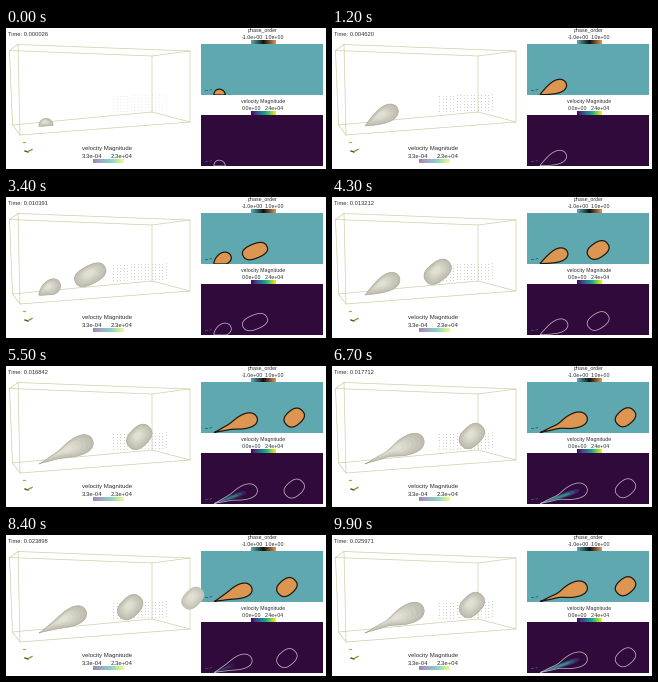
These frames come from a looping animation (320 px wide and 141 px high, 10000 ms). A matplotlib script:

```python
import numpy as np
import matplotlib.pyplot as plt
from matplotlib.animation import FuncAnimation
from matplotlib.colors import LinearSegmentedColormap, to_rgb
from matplotlib.patches import Polygon, Rectangle

W, H, DPI = 320, 141, 100
FRAMES, INTERVAL = 100, 100
PX = 72 / DPI

# Bubbles grow for PINCH seconds, then one leaves every PERIOD seconds.
PERIOD, PINCH = 0.00826, 0.0097
SPEED = 7600
LIFETIME = 0.0145

# The solver takes small time steps just before each pinch-off.
CLOCK = np.array([(0, 0.000026), (23, 0.008831), (31, 0.00945),
                  (43, 0.013212), (55, 0.016842), (67, 0.017712),
                  (84, 0.023898), (88, 0.0251), (99, 0.025971)])


def floor(x):
    return 98.5 - 0.073 * (x - 33)


def to_side(p, base):
    """Project points of the 3D mid plane onto a slice panel."""
    x, y = np.transpose(p)
    return np.column_stack([208 + 0.8 * (x - 33), base - 0.76 * (floor(x) - y)])


FOOT = np.array([33, 98])


def bulb(g):
    """Centre and radius of the growing head, g from 0 to 1."""
    return np.array([40 + 44 * g**1.2, 98 - 22 * g**0.6]), 7 + 2.7 * g


def growing(g):
    """Dome that stretches into a teardrop with a thinning neck."""
    centre, r = bulb(g)
    axis = (centre - FOOT) / np.hypot(*(centre - FOOT))
    normal = np.array([axis[1], -axis[0]])
    tip = centre + axis * r
    s = (1 - np.cos(np.linspace(0, np.pi, 40)))[:, None] / 2
    u = s ** (1 + 2 * g)
    neck = 1 - 0.45 * g**6 * np.exp(-((s - 0.36) / 0.16) ** 2)
    half = r * np.sqrt(4 * u * (1 - u)) * neck
    spine = FOOT + (tip - FOOT) * s
    c = np.vstack([spine + normal * half, (spine - normal * half)[::-1]])
    c[:, 1] = np.minimum(c[:, 1], floor(c[:, 0]))
    return c


def drifting(age):
    """Free bubble: a tilted, slightly boxy ellipse."""
    k = min(age / 0.005, 1)
    x = 79 + SPEED * age
    y = 78.5 - 0.14 * (x - 79)
    a, b, tilt = 17 - 3 * k, 9 + 0.6 * k, np.radians(25 + 20 * k)
    th = np.linspace(0, 2 * np.pi, 80, endpoint=False)
    u, v = (m * np.sign(f) * np.abs(f) ** 0.8
            for m, f in ((a, np.cos(th)), (b, np.sin(th))))
    return np.column_stack([x + u * np.cos(tilt) + v * np.sin(tilt),
                            y - u * np.sin(tilt) + v * np.cos(tilt)])


fig = plt.figure(figsize=(W / DPI, H / DPI), dpi=DPI, facecolor="white")
ax = fig.add_axes([0, 0, 1, 1])
ax.set_xlim(0, W)
ax.set_ylim(H, 0)
ax.axis("off")


def label(x, y, s, px, ha="center"):
    return ax.text(x, y, s, fontsize=px * PX, family="Liberation Sans",
                   color="#303030", ha=ha, va="baseline", zorder=9)


def line(pts, color, lw=0.7, **kw):
    ax.plot(*zip(*pts), color=color, lw=lw * PX, **kw)


def bar(x0, x1, y0, y1, cmap, alpha=1):
    ax.imshow(np.linspace(0, 1, 64)[None], extent=(x0, x1, y1, y0), cmap=cmap,
              alpha=alpha, aspect="auto", zorder=3)


def poly(color, edge="none", lw=0.0, clip=None, **kw):
    p = Polygon([(0, 0), (0, 1), (1, 0)], fc=color, ec=edge, lw=lw * PX, **kw)
    ax.add_patch(p)
    if clip is not None:
        p.set_clip_path(clip)
    return p


def panel(y, color):
    return ax.add_patch(Rectangle((195, y), 122, 51, fc=color, lw=0, zorder=1))


# Channel outline
FRONT = [(12, 16.5), (184, 23), (184, 94), (14, 107)]
BACK = [(3.5, 22.5), (146, 28), (146, 84), (6.5, 97)]
for face in (FRONT, BACK):
    line(face + face[:1], "#cfcda6")
for edge in zip(FRONT, BACK):
    line(edge, "#cfcda6")

gx, gy = np.meshgrid(np.arange(107, 162, 3.5), np.arange(68, 85, 3))
seeds = ax.scatter(gx, gy - (gx - 107) * 0.03, s=0.35, c="#bdbdb0", lw=0)

# Orientation axes
line([(17, 114), (19, 114)], "#b5b030", 1.2)
line([(19, 123), (22, 124)], "#3f5a25", 1.4)
line([(23, 123), (26, 121.5)], "#8f9a2c", 1.4)

# Slice panels
top = panel(16, "#5fa8b0")
low = panel(87, "#300a3a")
for y, c in ((62, "#2f6464"), (133, "#28586a")):
    line([(199, y), (201, y)], c, 0.9, zorder=2)
    line([(204, y), (205.5, y - 0.5)], c, 0.9, zorder=2)

# Legends
clock = label(2, 7.6, "", 5.8, "left")
label(101, 122, "velocity Magnitude", 6)
label(75.5, 129.5, "3.3e-04", 6, "left")
label(127, 129.5, "2.3e+04", 6, "right")
bar(87, 118, 131.5, 135.5, "viridis", 0.5)
phase_map = LinearSegmentedColormap.from_list(
    "phase", ["#5fa8b0", "#101010", "#de9450"])
for x, y, name, lo, hi, cmap in (
        (257, 4.3, "phase_order", "-1.0e+00", "1.0e+00", phase_map),
        (257, 75.5, "velocity Magnitude", "0.0e+00", "2.4e+04", "viridis")):
    label(x, y, name, 5.3)
    label(x - 21, y + 6.5, lo, 5.3, "left")
    label(x + 21, y + 6.5, hi, 5.3, "right")
    bar(x - 12, x + 13, y + 8, y + 11.5, cmap)

channel = Rectangle((0, 0), 168, H, transform=ax.transData)


class Bubble:
    """One body in the 3D view plus its two slices."""

    SHADES = 5

    def __init__(self):
        dark, light = (np.array(to_rgb(c)) for c in ("#bebcae", "#e2e0d4"))
        self.body = poly(dark, "#a9a796", 0.6, channel, zorder=4)
        self.inner = [poly(dark + (light - dark) * (i + 1) / self.SHADES,
                           clip=self.body, zorder=5)
                      for i in range(self.SHADES)]
        self.phase = poly("#dd9552", "#1c1610", 1.2, top, zorder=4)
        self.ring = poly("none", "#b9aebd", 0.8, low, zorder=6)
        self.parts = [self.body, self.phase, self.ring, *self.inner]

    def show(self, c):
        for p in self.parts:
            p.set_visible(c is not None)
        if c is None:
            return
        mid = c.mean(axis=0)
        self.body.set_xy(c)
        for i, p in enumerate(self.inner):
            k = 0.9 - 0.15 * i
            p.set_xy(mid + (c - mid) * k - (1 - k) * 2)
        self.phase.set_xy(to_side(c, 67))
        self.ring.set_xy(to_side(c, 138))


attached, free, leaving = Bubble(), Bubble(), Bubble()
jet = [poly(c, clip=low, zorder=5) for c in ("#3b3470", "#2f6a88", "#3fae8c")]


def draw_jet(g):
    """Fast flow through the thinning neck."""
    k = np.clip((g - 0.7) / 0.25, 0, 1)
    start, end = to_side([FOOT, bulb(g)[0]], 138)
    axis = end - start
    normal = np.array([-axis[1], axis[0]]) / np.hypot(*axis)
    s = np.linspace(0, 1, 24)[:, None]
    for i, p in enumerate(jet):
        half = (0.5 + 3.6 * s) * np.sqrt(1 - s**4) * (1 - 0.3 * i)
        mid = start + axis * s * (1 - 0.12 * i) * (0.6 + 0.4 * k)
        p.set_xy(np.vstack([mid + normal * half, (mid - normal * half)[::-1]]))
        p.set_alpha(k * (0.8 - 0.1 * i))


def update(i):
    t = np.interp(i, *CLOCK.T)
    clock.set_text(f"Time: {t:.6f}")
    cycle = int(max(0, np.ceil((t - PINCH) / PERIOD)))
    phase = t - cycle * PERIOD
    g = phase / PINCH
    attached.show(growing(g))
    for bubble, n in ((free, 1), (leaving, 2)):
        age = phase + n * PERIOD - PINCH
        bubble.show(drifting(age) if cycle >= n and age < LIFETIME else None)
    draw_jet(g)
    seeds.set_alpha(0.3 + 0.5 * min(t / 0.004, 1))
    return []


anim = FuncAnimation(fig, update, frames=FRAMES, interval=INTERVAL,
                     init_func=lambda: update(0), repeat=True, repeat_delay=0)
plt.show()
```
